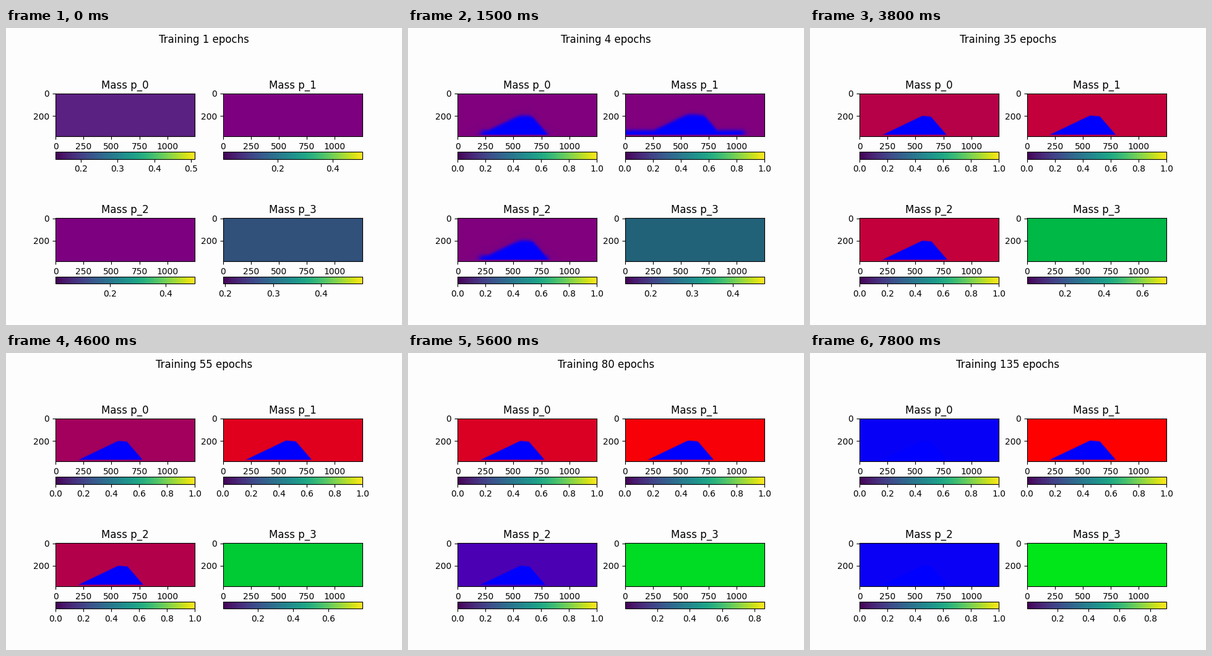
Recreate the animation shown at these times as a matplotlib script. Size 640 px wide and 480 px high, loop 8000 ms.

```python
import numpy as np
import matplotlib.pyplot as plt
from matplotlib.animation import FuncAnimation

W, H = 1248, 384
STEP_MS, LOOP_MS = 100, 8000
PAPER = "#fdfdfd"
FLOOR = 370  # lower edge of the mass

X, Y = np.meshgrid(np.arange(0.5, W, 2), np.arange(0.5, H, 2))

# Colours before any mass shows
VIOLET, PURPLE = (.358, .131, .511), (.491, .002, .507)

# Per panel: plain colour, first epoch with a mass, early and lasting
# spread of the outline, half width of the early skirt
PANELS = [(VIOLET, 4, 25, 0, 285), (PURPLE, 3, 50, 10, 560), (PURPLE, 3, 25, 5, 300)]

# Key points of the training: share of red around each mass, green of panel 3
EPOCHS = [1, 10, 35, 65, 80, 100, 135]
RED = [
    [.502, .502, .714, .6, .855, .235, .031],
    [.502, .51, .765, .941, .972, 1, 1],
    [.502, .502, .765, .675, .298, .275, .039],
]
GREEN = np.array([.3185, .501, .723, .82, .859, .853, .904])


def epoch_at(ms):
    if ms < 2500:
        return 1 + ms // 500
    if ms < 3000:
        return 10
    return 15 + 5 * ((ms - 3000) // 200)


def ramp(v):
    return 1 / (1 + np.exp(-np.clip(v, -40, 40)))


def smooth_max(lines, width):
    return width * np.logaddexp.reduce([line / width for line in lines])


def mass(panel, epoch):
    """Opacity of the mass: a blurred hill that sharpens into three straight edges."""
    _, _, early, lasting, half = PANELS[panel]
    youth = np.exp((4 - epoch) / 5)
    spread = lasting + early * youth
    soft = 1.5 + 7 * youth
    x = X[0]
    left = 211 - .475 * (x - 542 + .6 * spread)
    cap = 204 + .08 * (x - 576) - .3 * spread
    right = 215 + 1.15 * (x - 642 - 1.3 * spread)
    top = smooth_max([left, cap, right], 1 + 9 * youth)
    hill = ramp((Y - top) / soft)
    skirt = ramp((Y - 330) / soft) * ramp((half - abs(X - 500)) / 15)
    return np.maximum(hill, min(youth, 1) * skirt) * ramp((FLOOR - Y) / 1.5)


def flat(color):
    return np.full((*X.shape, 3), color), min(color), max(color)


def panel_at(panel, epoch):
    """Picture of one panel and the limits of its colour bar."""
    if panel == 3:
        r = .001 + .1945 * np.exp(-.108 * (epoch - 1) ** 1.1)
        g = 1 - np.exp(np.interp(epoch, EPOCHS, np.log(1 - GREEN)))
        return flat((r, g, 1 - r - g))
    plain, first = PANELS[panel][:2]
    if epoch < first:
        return flat(plain)
    red = np.interp(epoch, EPOCHS, RED[panel]) * (1 - mass(panel, epoch))
    return np.stack([red, np.zeros_like(red), 1 - red], axis=-1), 0, 1


fig, axes = plt.subplots(2, 2, figsize=(6.4, 4.8), dpi=100, facecolor=PAPER)
title = fig.suptitle("Training 1 epochs")
images = []
for i, ax in enumerate(axes.flat):
    rgb, lo, hi = panel_at(i, 1)
    im = ax.imshow(rgb, vmin=lo, vmax=hi, extent=(-.5, W - .5, H - .5, -.5))
    ax.set_title(f"Mass p_{i}")
    fig.colorbar(im, ax=ax, orientation="horizontal")
    images.append(im)


def draw(frame):
    epoch = epoch_at(frame * STEP_MS)
    title.set_text(f"Training {epoch} epochs")
    for i, im in enumerate(images):
        rgb, lo, hi = panel_at(i, epoch)
        im.set_data(rgb)
        im.set_clim(lo, hi)
    return [title, *images]


anim = FuncAnimation(fig, draw, frames=LOOP_MS // STEP_MS, interval=STEP_MS,
                     repeat=True, repeat_delay=0, blit=False)
plt.show()
```
